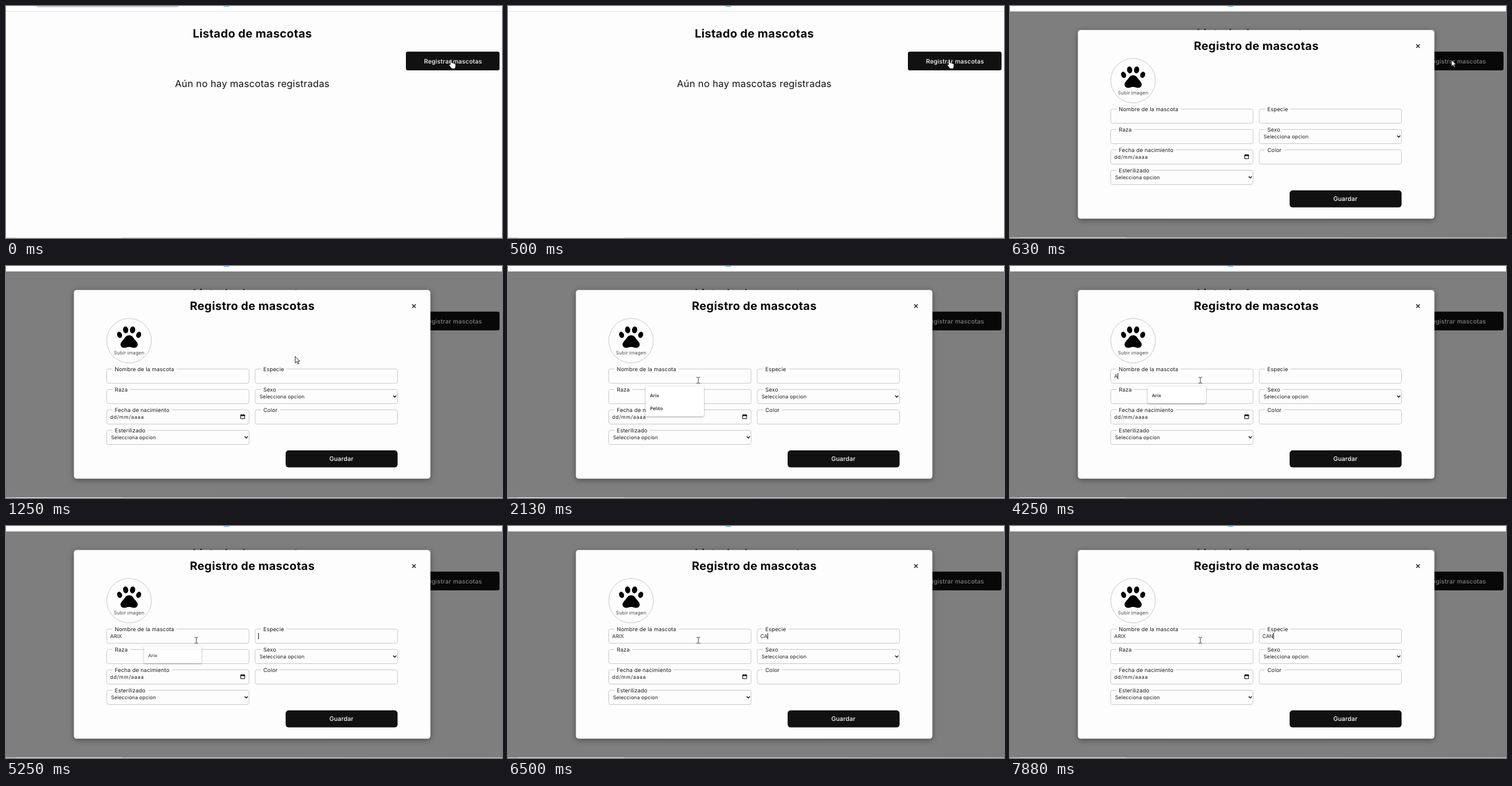
These frames come from a looping animation (800x375 px, 8000 ms). An HTML page:

```html
<!DOCTYPE html>
<html lang="es">
<head>
<meta charset="utf-8">
<title>Registro de mascotas</title>
<style>
html, body { margin: 0; width: 100%; height: 100%; overflow: hidden; background: #fdfdfd; }
svg { display: block; width: 100vw; height: 100vh; }
text { font: 400 8.1px Inter, sans-serif; font-optical-sizing: none; letter-spacing: .015em; fill: #1c1c1c; text-rendering: geometricPrecision; white-space: pre; }
.mid { text-anchor: middle; }
.title { font-size: 18.6px; font-weight: 700; fill: #080808; }
.empty { font-size: 15.4px; fill: #111; }
.btn { font-size: 9.9px; font-weight: 500; fill: #fff; }
.label { font-size: 8.75px; stroke: #fdfdfd; stroke-width: 9px; stroke-linejoin: round; paint-order: stroke; }
.small { font-size: 7.7px; fill: #4c4c4c; }
.date { letter-spacing: .08em; }
.option { font: 600 7.6px "Open Sans", sans-serif; letter-spacing: 0; fill: #222; }
.box { fill: none; stroke: #cbcbcb; }
.line { fill: none; stroke: #111; stroke-width: 1.3; }
.cursor { fill: #fff; stroke: #000; stroke-width: .8; stroke-linejoin: round; }
#modalBox { filter: drop-shadow(0 2px 5px rgba(0, 0, 0, .4)); }
#listBox { fill: #fff; filter: drop-shadow(0 1px 1.5px rgba(0, 0, 0, .35)); }
#list { transform-origin: 269px 208px; }
</style>
</head>
<body>
<svg viewBox="0 0 800 375" preserveAspectRatio="none">
  <defs>
    <linearGradient id="edge">
      <stop offset="0" stop-color="#cfd6d2"/>
      <stop offset=".35" stop-color="#c3d8cd"/>
      <stop offset=".5" stop-color="#d8d6bd"/>
      <stop offset=".75" stop-color="#c2d6c6"/>
      <stop offset="1" stop-color="#c9c9c9"/>
    </linearGradient>
    <filter id="soft" x="-5%" y="-200%" width="110%" height="500%"><feGaussianBlur stdDeviation="1"/></filter>
  </defs>

  <rect width="800" height="375" fill="#fdfdfd"/>
  <text class="title mid" x="397.3" y="51">Listado de mascotas</text>
  <text class="empty mid" x="397.2" y="130.6">Aún no hay mascotas registradas</text>
  <rect x="645" y="73.7" width="151" height="30.3" rx="3" fill="#111"/>
  <text class="btn mid" x="721" y="92.6">Registrar mascotas</text>

  <g id="modal">
    <rect y="8" width="800" height="366" opacity=".5"/>
    <rect id="modalBox" x="109.5" y="38.7" width="575" height="305" rx="4.5" fill="#fdfdfd"/>
    <text class="title mid" x="397.2" y="71">Registro de mascotas</text>
    <path class="line" d="M655.2 62l5.6 5.6m0-5.6l-5.6 5.6"/>

    <circle class="box" cx="198.5" cy="120.7" r="36"/>
    <ellipse cx="183.2" cy="111.3" rx="3.9" ry="5.1" transform="rotate(-22 183.2 111.3)"/>
    <ellipse cx="193" cy="103.3" rx="4.2" ry="5.5" transform="rotate(-8 193 103.3)"/>
    <ellipse cx="204.2" cy="103.3" rx="4.2" ry="5.5" transform="rotate(8 204.2 103.3)"/>
    <ellipse cx="214" cy="111.3" rx="3.9" ry="5.1" transform="rotate(22 214 111.3)"/>
    <path d="M198.6 112c5.5 0 7 4.6 9.6 7.6s4.8 5.2 4.2 8.4-4 4.8-7 4.200-4.400-1.400-6.800-1.400-3.800.8-6.800 1.400-6.400-1-7-4.200 1.600-5.400 4.200-8.400 4.100-7.600 9.600-7.600z"/>
    <text class="small mid" x="198.5" y="143">Subir imagen</text>

    <g id="fields"></g>
    <rect x="451" y="298" width="180.6" height="27.6" rx="5" fill="#111"/>
    <text class="btn mid" x="541" y="315.2">Guardar</text>
    <text id="name" x="168" y="181"></text>
    <text id="kind" x="407" y="181"></text>
    <rect id="caret" y="173" width="1" height="10" fill="#111"/>

    <g id="list">
      <rect id="listBox" x="222" y="194.5" width="94" rx="3"/>
      <text class="option" x="229" y="211.6">Arix</text>
      <text class="option" id="second" x="229" y="233.4">Pelito</text>
    </g>
  </g>

  <rect width="800" height="8" fill="#fff"/>
  <rect y="8" width="800" height="1" fill="#e2e2e2"/>
  <rect x="351" width="9" height="1" fill="#6aa5dc"/>
  <rect id="tip" x="50" y="-2" width="228" height="3" fill="#999" filter="url(#soft)"/>
  <rect y="374" width="800" height="1" fill="url(#edge)"/>
  <rect x="16" y="374" width="171" height="1" fill="#f7f7f7"/>

  <g id="pointer">
    <path id="hand" class="cursor" d="M-1.2 1.2q0-1.4 1.2-1.4t1.2 1.4v4.2q2-.8 2.4.6 1.7-.6 2 .7 1.9-.3 1.9 1.3v3q0 1.8-1.3 3.8h-5.2q-1.5-2.400-3.900-5.200c-1.100-1.400.6-2.400 1.700-1.100z"/>
    <path id="arrow" class="cursor" d="M0 0v10.6l2.5-2.3 1.7 3.9 1.7-.7-1.7-3.8h3.4z"/>
    <path id="beam" d="M-3-4.5h2.200l.8.7.8-.7H3M0-3.800v8M-3 4.900h2.200l.8-.7.8.7H3" fill="none" stroke="#444"/>
  </g>
</svg>
<script>
const $ = id => document.getElementById(id);
const TICK = 125, LOOP = 8000;

const chevron = (x, y) =>
  `<path class="line" d="M${x + 222.5} ${y + 10}l2.5 2.5 2.5-2.5"/>`;
const calendar = (x, y) =>
  `<path d="M${x + 216} ${y + 8.5}h6.4v5.8h-6.4z" fill="none" stroke="#111"/>
   <path d="M${x + 215.5} ${y + 8}h7.4v2h-7.4zM${x + 217} ${y + 7}h1v1h-1zm3.4 0h1v1h-1z"/>`;

function field(col, row, label, type) {
  const x = 162.5 + col * 239.5, y = 166.5 + row * 33;
  const extra = {
    select: `<text x="${x + 7}" y="${y + 14.2}">Selecciona opcion</text>${chevron(x, y)}`,
    date: `<text class="date" x="${x + 5.5}" y="${y + 14.5}">dd/mm/aaaa</text>${calendar(x, y)}`
  };
  return `<rect class="box" x="${x}" y="${y}" width="229.5" height="23" rx="3"/>
    <text class="label" x="${x + 13}" y="${y + 3.4}">${label}</text>${extra[type] || ''}`;
}

$('fields').innerHTML = [
  field(0, 0, 'Nombre de la mascota'),
  field(1, 0, 'Especie'),
  field(0, 1, 'Raza'),
  field(1, 1, 'Sexo', 'select'),
  field(0, 2, 'Fecha de nacimiento', 'date'),
  field(1, 2, 'Color'),
  field(0, 3, 'Esterilizado', 'select')
].join('');

// Each track holds [tick, value] pairs; a value stays until the next one.
const tracks = {
  name: [[0, ''], [22, 'a'], [30, ''], [33, 'A'], [36, 'ARI'], [39, 'ARIX']],
  kind: [[0, ''], [49, 'C'], [52, 'CA'], [57, 'C'], [58, 'CA'], [63, 'CAN']],
  caret: [[0, ''], [13, 'name'], [17, ''], [22, 'name'], [27, ''], [30, 'name'],
    [42, 'kind'], [46, ''], [49, 'kind'], [56, ''], [57, 'kind']],
  rows: [[0, 2], [23, 1]],
  list: [[0, 0], [14, 1], [30, .8], [31, .35], [32, 0], [34, 1], [42, .8], [43, .35], [44, 0]]
};
const at = (track, k) => tracks[track].filter(p => p[0] <= k).pop()[1];
const show = (id, on) => { $(id).style.display = on ? '' : 'none'; };
const ease = (k, a, b) => {
  const u = Math.min(1, Math.max(0, (k - a) / (b - a)));
  return u * u * (3 - 2 * u);
};

function drawPointer(k) {
  const open = k >= 5, u = ease(k, 6, 13);
  const x = open ? 712 - 405 * u : 717.7 - 6 * ease(k, 0, 4);
  const y = open ? 87 + 97.5 * u : 86.5;
  const typing = open && x < 392 && y > 166;
  $('pointer').setAttribute('transform', `translate(${x} ${y})`);
  show('hand', !open);
  show('arrow', open && !typing);
  show('beam', typing);
}

function drawForm(k) {
  for (const id of ['name', 'kind']) $(id).textContent = at(id, k);
  const focus = at('caret', k);
  show('caret', focus);
  if (focus) {
    const input = $(focus);
    const width = input.textContent ? input.getComputedTextLength() : 0;
    $('caret').setAttribute('x', +input.getAttribute('x') + width - .2);
  }
  const rows = at('rows', k), alpha = at('list', k);
  show('list', alpha);
  show('second', rows > 1);
  $('listBox').setAttribute('height', rows > 1 ? 48.5 : 27.5);
  $('list').style.opacity = alpha;
  $('list').style.transform = `scale(${.9 + .1 * Math.sqrt(alpha)})`;
}

let last = -1;
function frame() {
  const k = Math.floor(performance.now() % LOOP / TICK);
  if (k !== last) {
    last = k;
    show('tip', k < 2);
    show('modal', k >= 5);
    drawForm(k);
    drawPointer(k);
  }
  requestAnimationFrame(frame);
}
frame();
</script>
</body>
</html>
```
